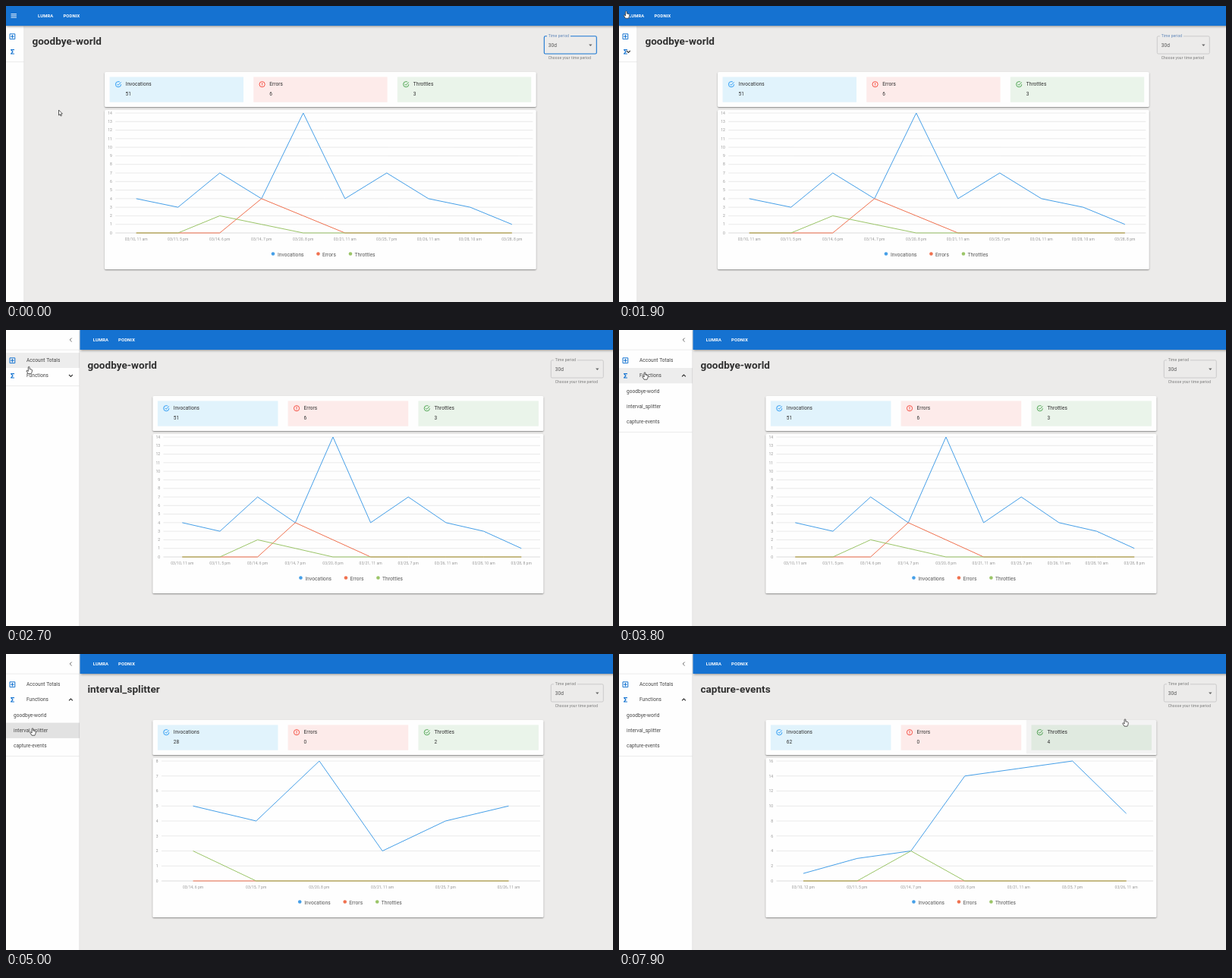
These frames come from a looping animation (800x390 px, 8000 ms). An HTML page with a canvas:

```html
<!DOCTYPE html>
<html lang="en">
<head>
<meta charset="utf-8">
<title>Function metrics</title>
<style>
  html, body { margin: 0; width: 100%; height: 100%; overflow: hidden; background: #ecebea; }
  canvas { display: block; width: 800px; height: 390px; }
</style>
</head>
<body>
<canvas id="stage"></canvas>
<script>
const canvas = document.getElementById('stage');
const ctx = canvas.getContext('2d');
const ratio = Math.max(1, window.devicePixelRatio || 1);
canvas.width = 800 * ratio;
canvas.height = 390 * ratio;

const LOOP = 8000;
const BLUE = '#1976d2', WHITE = '#fefefe', INK = '#303030';
const FONT = 'Roboto, "Liberation Sans", sans-serif';
const OPEN_AT = 1964, EXPAND_AT = 3100, PICK_2 = 4600, PICK_3 = 6770;

const series = [
  { name: 'Invocations', color: '#459fe8', tint: '#e1f3fc', dot: -67.3, label: -61.3 },
  { name: 'Errors', color: '#f0714f', tint: '#fdebea', dot: -7.8, label: -2.3 },
  { name: 'Throttles', color: '#9bc568', tint: '#eaf4ea', dot: 34.7, label: 40.3 }
];
const iconColors = ['#2196f3', '#f44336', '#43a047'];

const pages = [
  {
    name: 'goodbye-world', max: 14, step: 1,
    ticks: ['03/10, 11 am', '03/11, 5 pm', '03/14, 6 pm', '03/14, 7 pm', '03/20, 8 pm',
      '03/21, 11 am', '03/25, 7 pm', '03/26, 11 am', '03/28, 10 am', '03/28, 8 pm'],
    data: [[4, 3, 7, 4, 14, 4, 7, 4, 3, 1], [0, 0, 0, 4, 2, 0, 0, 0, 0, 0], [0, 0, 2, 1, 0, 0, 0, 0, 0, 0]]
  },
  {
    name: 'interval_splitter', max: 8, step: 1,
    ticks: ['03/14, 6 pm', '03/15, 7 pm', '03/20, 8 pm', '03/21, 11 am', '03/25, 7 pm', '03/26, 11 am'],
    data: [[5, 4, 8, 2, 4, 5], [0, 0, 0, 0, 0, 0], [2, 0, 0, 0, 0, 0]]
  },
  {
    name: 'capture-events', max: 16, step: 2,
    ticks: ['03/10, 12 pm', '03/11, 5 pm', '03/14, 7 pm', '03/20, 8 pm', '03/21, 11 am',
      '03/25, 7 pm', '03/26, 11 am'],
    data: [[1, 3, 4, 14, 15, 16, 9], [0, 0, 0, 0, 0, 0, 0], [0, 0, 4, 0, 0, 0, 0]]
  }
];

// Pointer stops: time, x, y
const path = [
  [0, 69.5, 137], [150, 69.5, 137], [900, 20, 40], [1350, 9.5, 7], [2250, 9.5, 7], [2850, 34, 56],
  [3850, 34, 56], [4350, 35, 98], [5650, 35, 98], [6000, 35.5, 122], [6970, 35.5, 122], [7700, 667, 86]
];

const clamp = v => Math.min(1, Math.max(0, v));
const smooth = v => { v = clamp(v); return v * v * (3 - 2 * v); };
const ramp = (t, start, length) => smooth((t - start) / length);

function pointer(t) {
  let i = 0;
  while (i < path.length - 1 && path[i + 1][0] <= t) i++;
  const a = path[i], b = path[i + 1] || a;
  const k = a === b ? 0 : smooth((t - a[0]) / (b[0] - a[0]));
  return { x: a[1] + (b[1] - a[1]) * k, y: a[2] + (b[2] - a[2]) * k };
}

function layout(t) {
  const p = ramp(t, OPEN_AT, 225);
  const side = 24 + 73 * p;
  const width = (800 - side) * 0.733;
  const left = (800 + side) / 2 + 2.4 - width / 2;
  return { p, side, left, width, col: width / 3 };
}

// Share of the last moments the pointer spent inside a box
function hover(t, x, y, w, h) {
  let n = 0;
  for (let k = 0; k < 5; k++) {
    const c = pointer(Math.max(0, t - k * 30));
    if (c.x >= x && c.x < x + w && c.y >= y && c.y < y + h) n++;
  }
  return n / 5;
}

function rect(x, y, w, h, color) {
  ctx.fillStyle = color;
  ctx.fillRect(x, y, w, h);
}

function round(x, y, w, h, r) {
  ctx.beginPath();
  ctx.roundRect(x, y, w, h, r);
}

function line(points, color, width = 1, close = false) {
  ctx.beginPath();
  points.forEach(([x, y], i) => i ? ctx.lineTo(x, y) : ctx.moveTo(x, y));
  if (close) ctx.closePath();
  ctx.strokeStyle = color;
  ctx.lineWidth = width;
  ctx.stroke();
}

function disc(x, y, r, color) {
  ctx.beginPath();
  ctx.arc(x, y, r, 0, Math.PI * 2);
  ctx.fillStyle = color;
  ctx.fill();
}

function text(str, x, y, size, color, { weight = 400, align = 'left', space = 0.0094 } = {}) {
  ctx.font = `${weight} ${size}px ${FONT}`;
  ctx.letterSpacing = `${space * size}px`;
  ctx.textAlign = align;
  ctx.textBaseline = 'alphabetic';
  ctx.fillStyle = color;
  ctx.fillText(str, x, y + size * 0.355);
}

function shadowed(color, y, blur, draw) {
  ctx.save();
  ctx.shadowColor = color;
  ctx.shadowOffsetY = y * ratio;
  ctx.shadowBlur = blur * ratio;
  draw();
  ctx.restore();
}

function paper(x, y, w, h) {
  shadowed('rgba(0,0,0,.42)', 0.9, 1.8, () => {
    round(x, y, w, h, 1.6);
    ctx.fillStyle = WHITE;
    ctx.fill();
  });
}

function statIcon(x, y, color, alert) {
  ctx.beginPath();
  if (alert) ctx.arc(x, y, 3.6, 0, Math.PI * 2);
  else ctx.arc(x, y, 3.6, 0, Math.PI * 1.68);
  ctx.strokeStyle = color;
  ctx.lineWidth = 0.9;
  ctx.stroke();
  if (alert) {
    line([[x, y - 2], [x, y + 0.6]], color, 0.9);
    rect(x - 0.45, y + 1.2, 0.9, 0.9, color);
  } else {
    line([[x - 1.8, y - 0.4], [x - 0.3, y + 1.2], [x + 3.7, y - 2.7]], color, 0.9);
  }
}

function drawStats(t, box, page) {
  paper(box.left, 87, box.width, 46);
  series.forEach((s, i) => {
    const x = box.left + i * box.col;
    const sum = page.data[i].reduce((a, b) => a + b, 0);
    rect(x + 6.6, 93.5, box.col - 13.2, 33.2, s.tint);
    statIcon(x + 18, 103.2, iconColors[i], i === 1);
    text(s.name, x + 27.6, 103, 6.5, INK);
    text(sum, x + 27.6, 115.6, 6.5, INK);
    const over = hover(t, x, 85, box.col, 47);
    if (over) rect(x, 87, box.col, 44.5, `rgba(0,0,0,${0.045 * over})`);
  });
}

function drawChart(box, page) {
  paper(box.left, 137, box.width, 210);
  const left = box.left + (page.max > 9 ? 14.2 : 11.7);
  const right = box.left + box.width - 4.5;
  const band = (right - left) / page.ticks.length;
  const px = i => left + band * (i + 0.5);
  const py = v => 299 - v * 158 / page.max;

  for (let v = 0; v <= page.max; v += page.step) {
    line([[left, py(v)], [right, py(v)]], v ? '#e5e5e5' : '#d4d4d4', 0.8);
    text(v, left - 4.3, py(v), 5, '#969696', { align: 'right' });
  }
  page.ticks.forEach((label, i) => text(label, px(i), 306.8, 5, '#969696', { align: 'center' }));
  page.data.forEach((row, k) => line(row.map((v, i) => [px(i), py(v)]), series[k].color, 1));

  const mid = (left + right) / 2;
  series.forEach(s => {
    disc(mid + s.dot, 326.5, 2.3, s.color);
    text(s.name, mid + s.label, 328, 6.6, '#555');
  });
}

function drawSelect(t, p) {
  const right = 778.3 + 9 * p, x = right - 69;
  const focus = t < 1800;
  round(x, 39.8, 69, 23.2, 1.6);
  ctx.strokeStyle = focus ? BLUE : '#bdbdbd';
  ctx.lineWidth = focus ? 1.1 : 0.7;
  ctx.stroke();
  rect(x + 3.6, 38.5, 31, 2.6, '#ecebea');
  text('Time period', x + 5.4, 39.6, 4.9, t < 2150 ? '#5b83b8' : '#777', { space: 0.03 });
  text('30d', x + 5.4, 51.5, 6.6, '#555');
  text('Choose your time period', x + 5.4, 68.3, 4.86, '#777', { space: 0.0333 });
  const a = right - 8;
  ctx.beginPath();
  ctx.moveTo(a - 2.2, 50.6);
  ctx.lineTo(a + 2.2, 50.6);
  ctx.lineTo(a, 52.9);
  ctx.fillStyle = '#666';
  ctx.fill();
}

function highlight(t, y, h, width, click) {
  const over = hover(t, 0, y, width, h);
  if (over) rect(0, y, width, h, `rgba(0,0,0,${0.065 * over})`);
  const age = t - click;
  if (age < 0 || age > 450) return;
  ctx.save();
  ctx.beginPath();
  ctx.rect(0, y, width, h);
  ctx.clip();
  disc(36, y + h / 2, 37 * age / 130, `rgba(0,0,0,${0.19 * clamp((450 - age) / 200)})`);
  ctx.restore();
}

function drawSidebar(t, side) {
  const grow = ramp(t, EXPAND_AT, 300);
  const end = 73.5 + 61 * grow;
  rect(0, 0, side, 390, WHITE);
  rect(side - 0.5, 0, 0.6, 390, '#d8d8d8');
  rect(0, 25.8, side, 0.6, '#dedede');

  ctx.save();
  ctx.beginPath();
  ctx.rect(0, 0, side, 390);
  ctx.clip();
  highlight(t, 30, 20, side, Infinity);
  highlight(t, 50, 20.3, side, EXPAND_AT);

  ctx.strokeStyle = BLUE;
  ctx.lineWidth = 1;
  ctx.strokeRect(5, 36.8, 6.8, 6.8);
  line([[8.4, 38], [8.4, 42.4]], BLUE, 1.1);
  line([[6.2, 40.2], [10.6, 40.2]], BLUE, 1.1);
  line([[11, 57.6], [6.6, 57.6], [9, 60.3], [6.6, 63], [11, 63]], BLUE, 1.2);

  if (t >= 1900) {
    const cx = side - 11.6;
    text('Account Totals', 27, 40, 6.5, '#444');
    text('Functions', 27, 60, 6.5, '#444');
    line([[cx + 1.2, 10.6], [cx - 1.2, 13], [cx + 1.2, 15.4]], '#555', 0.9);
    const d = t < EXPAND_AT ? 1.2 : -1.2;
    line([[cx - 2.4, 60.2 - d], [cx, 60.2 + d], [cx + 2.4, 60.2 - d]], '#333', 1.1);
  }

  if (grow) {
    ctx.beginPath();
    ctx.rect(0, 70, side, end - 70);
    ctx.clip();
    const clicks = [Infinity, PICK_2, PICK_3];
    pages.forEach((page, i) => {
      const y = 70.3 + i * 20.3;
      highlight(t, y, 20.3, side, clicks[i]);
      text(page.name, 10, y + 10.1, 6.5, '#444');
    });
  }
  ctx.restore();
  rect(0, end, side, 0.6, '#dedede');
}

function drawHeader(t, p) {
  const x = 97.5 * p;
  shadowed('rgba(0,0,0,.4)', 1, 3, () => rect(x, 0, 810 - x, 26, '#1572d1'));
  let nav = 42;
  if (t < 1900) {
    for (const y of [10.6, 12.8, 15]) rect(6.5, y - 0.4, 7.4, 0.9, '#fff');
  } else {
    nav = x + 13 + 4.2 * clamp(p * 3);
  }
  const style = { weight: 700, space: 0.0286 };
  text('LUMRA', nav, 12.5, 5.8, '#fff', style);
  text('PODNIX', nav + 33.4, 12.5, 5.8, '#fff', style);
}

function shape(x, y, points) {
  ctx.beginPath();
  points.forEach(([a, b], i) => i ? ctx.lineTo(x + a, y + b) : ctx.moveTo(x + a, y + b));
  ctx.closePath();
  ctx.fillStyle = '#fff';
  ctx.fill();
  ctx.strokeStyle = '#333';
  ctx.lineWidth = 0.8;
  ctx.stroke();
}

function drawPointer(t, box) {
  const { x, y } = pointer(t);
  const rows = y < 132 && y > 30 && x < box.side && (t > EXPAND_AT || y < 70);
  const menu = y < 22 && x < 18 && t < OPEN_AT;
  const stats = y > 85 && y < 132 && x > box.left && x < box.left + box.width;
  if (rows || menu || stats) {
    shape(x, y, [[-0.9, 0.4], [0, -0.2], [0.9, 0.4], [0.9, 3], [3.6, 3.6], [4.3, 4.6], [3.8, 7.4],
      [3, 9.2], [-1, 9.2], [-3.3, 5.6], [-2.6, 4.7], [-0.9, 6]]);
  } else {
    shape(x, y, [[0, 0], [0, 7], [1.6, 5.6], [2.7, 8], [3.8, 7.5], [2.8, 5.2], [4.9, 5]]);
  }
}

function draw(t) {
  const box = layout(t);
  const page = pages[t < PICK_2 ? 0 : t < PICK_3 ? 1 : 2];
  ctx.setTransform(ratio, 0, 0, ratio, 0, 0);
  ctx.lineJoin = 'round';
  rect(0, 0, 800, 390, '#ecebea');
  text(page.name, box.side + 10.4, 46.3, 13.5, INK, { weight: 700, space: 0.003 });
  drawSelect(t, box.p);
  drawStats(t, box, page);
  drawChart(box, page);
  drawSidebar(t, box.side);
  drawHeader(t, box.p);
  drawPointer(t, box);
}

const start = performance.now();
function tick() {
  draw((performance.now() - start) % LOOP);
  requestAnimationFrame(tick);
}
tick();
</script>
</body>
</html>
```
